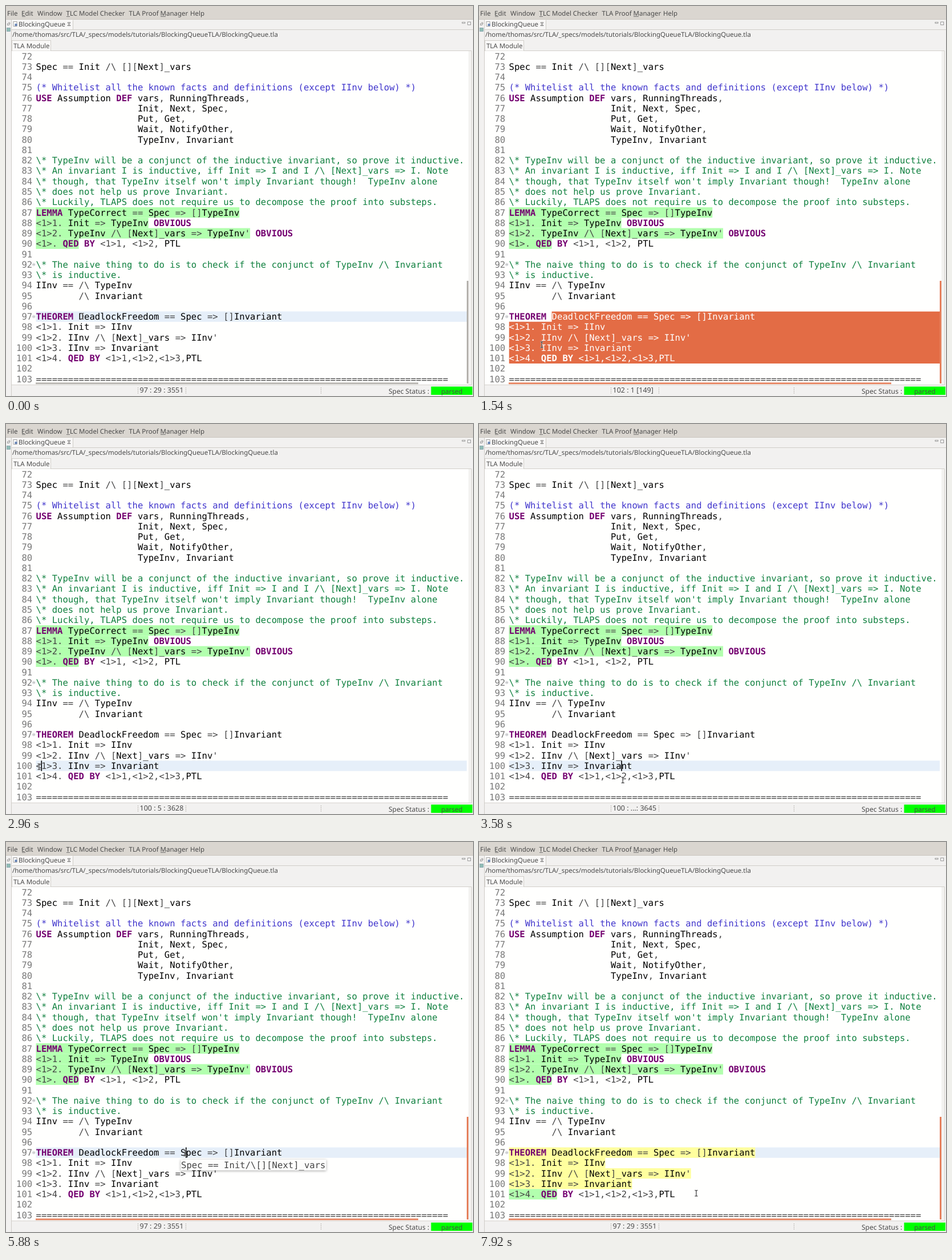
These frames come from a looping animation (819x684 px, 8 s). An HTML page:

```html
<!DOCTYPE html>
<html lang="en">
<head>
<meta charset="utf-8">
<title>Proof editor</title>
<style>
html, body { margin: 0; width: 100%; height: 100%; overflow: hidden; background: #f2f1f0; }
svg { display: block; width: 819px; height: 684px; }
text { text-rendering: geometricPrecision; }
.ui { font: 11.5px "Noto Sans", "Open Sans", sans-serif; fill: #4a4a4a; }
.code { font: 15.6px "DejaVu Sans Mono", monospace; fill: #444; }
.id { fill: #000; }
.kw { fill: #740070; font-weight: bold; }
.line { fill: #10803f; }
.block { fill: #4035cc; }
.num { fill: #787878; text-anchor: end; }
.picked text { fill: #fff; }
</style>
</head>
<body>
<svg id="stage" viewBox="0 0 819 684" xmlns="http://www.w3.org/2000/svg"></svg>
<script>
const LOOP = 8000, FIRST = 72, X0 = 52.5, CW = 9.39, RH = 18.26, EDGE = 808;
const lines = String.raw`
Spec == Init /\ [][Next]_vars

(* Whitelist all the known facts and definitions (except IInv below) *)
USE Assumption DEF vars, RunningThreads,
                   Init, Next, Spec,
                   Put, Get,
                   Wait, NotifyOther,
                   TypeInv, Invariant

\* TypeInv will be a conjunct of the inductive invariant, so prove it inductive.
\* An invariant I is inductive, iff Init => I and I /\ [Next]_vars => I. Note
\* though, that TypeInv itself won't imply Invariant though!  TypeInv alone
\* does not help us prove Invariant.
\* Luckily, TLAPS does not require us to decompose the proof into substeps.
LEMMA TypeCorrect == Spec => []TypeInv
<1>1. Init => TypeInv OBVIOUS
<1>2. TypeInv /\ [Next]_vars => TypeInv' OBVIOUS
<1>. QED BY <1>1, <1>2, PTL

\* The naive thing to do is to check if the conjunct of TypeInv /\ Invariant
\* is inductive.
IInv == /\ TypeInv
        /\ Invariant

THEOREM DeadlockFreedom == Spec => []Invariant
<1>1. Init => IInv
<1>2. IInv /\ [Next]_vars => IInv'
<1>3. IInv => Invariant
<1>4. QED BY <1>1,<1>2,<1>3,PTL
`.split("\n");
lines.push("=".repeat(77));

const rowY = n => 535.6 + (n - 97) * RH;
const colX = c => X0 + c * CW;
const stage = document.getElementById("stage");

function add(parent, tag, attrs = {}, content) {
  const node = document.createElementNS("http://www.w3.org/2000/svg", tag);
  for (const key in attrs) node.setAttribute(key, attrs[key]);
  if (content !== undefined) node.textContent = content;
  parent.appendChild(node);
  return node;
}
const box = (parent, x, y, width, height, fill, more) =>
  add(parent, "rect", { x, y, width, height, fill, ...more });
const stroke = (parent, d, color, width = 1) =>
  add(parent, "path", { d, fill: "none", stroke: color, "stroke-width": width });
const label = (x, y, str, size = 11.5) =>
  add(stage, "text", { x, y, class: "ui", style: `font-size:${size}px` }, str);
const show = (node, on) => node.setAttribute("visibility", on ? "visible" : "hidden");

function drawCode(parent, str, y) {
  const kind = str.startsWith("(*") ? "block" : str.startsWith("\\*") ? "line" : "";
  const rule = kind ? /\S+/g : /[A-Za-z_]\w*|[^\sA-Za-z_]+/g;
  for (const m of str.matchAll(rule)) {
    const type = kind || (/^(USE|DEF|LEMMA|OBVIOUS|QED|BY|THEOREM)$/.test(m[0]) ? "kw"
      : /^[A-Za-z_]/.test(m[0]) ? "id" : "");
    add(parent, "text", { x: colX(m.index), y, class: "code " + type }, m[0]);
  }
}
function drawRows(parent, from) {
  lines.forEach((str, i) => {
    if (i + FIRST >= from) drawCode(parent, str, rowY(i + FIRST) + 14.5);
  });
}
function mark(parent, row, cols, color) {
  return box(parent, X0, rowY(row), cols * CW, RH, color);
}

// Window frame
box(stage, 0, 0, 819, 684, "#f2f1f0");
box(stage, 0, 0, 819, 23.5, "#dad6d0");
stroke(stage, "M0 23.5H819", "#cbc7c0");
[[2, "File"], [27, "Edit"], [55, "Window"], [105.5, "TLC Model Checker"],
 [215.5, "TLA Proof Manager"], [323, "Help"]].forEach(([x, str]) => label(x, 16.6, str));
stroke(stage, "M28 18.5H34M106 18.5H112M271 18.5H280", "#5a5a5a", 0.8);

stroke(stage, "M9.5 684V24M9.5 41.5H819M117.5 41V26Q117.5 23.5 115 23.5", "#cfccc7");
box(stage, 10, 24, 107, 17, "#f8f7f6");
label(22, 35.8, "BlockingQueue", 11.44);
box(stage, 13, 27.5, 6, 8, "#fff", { stroke: "#8a8a8a", "stroke-width": 0.8 });
box(stage, 15.5, 31, 4, 4, "#6a87b8");
stroke(stage, "M108 29L113 34.5M113 29L108 34.5M108 29H113M108 34.5H113", "#666", 0.9);
box(stage, 800, 28.5, 5, 1.8, "#fff", { stroke: "#777", "stroke-width": 0.7 });
box(stage, 809.8, 28, 5, 5, "#fff", { stroke: "#777", "stroke-width": 0.8 });
box(stage, 2.5, 31, 3, 2.6, "#fff", { stroke: "#777", "stroke-width": 0.7 });
stroke(stage, "M4 29.2H6.8V32", "#777", 0.7);
box(stage, 1.5, 38.5, 6, 6, "#8fbcb4", { stroke: "#6f8f9f", "stroke-width": 0.6 });
label(11, 54, "/home/thomas/src/TLA/_specs/models/tutorials/BlockingQueueTLA/BlockingQueue.tla", 11.48);
stroke(stage, "M10 78.5H816.5", "#d2cfca");
box(stage, 10.5, 60.5, 68, 18.5, "#faf9f8", { stroke: "#c9c6c1", "stroke-width": 0.8 });
label(13, 73.7, "TLA Module", 11.44);
box(stage, 10, 79, 801, 585, "#fffffe");
box(stage, 811, 79, 5.5, 585, "#f3f2f0");
stroke(stage, "M10 664.5H817M816.5 79V664", "#d6d3ce");

// Status bar
stroke(stage, "M231.5 669V681M315.5 669V681M552.5 669V681", "#aaa6a0");
[231.5, 315.5, 552.5].forEach(x => stroke(stage, `M${x} 670.5V681`, "#f2f1f0", 1.2)
  .setAttribute("stroke-dasharray", "1.5 1.5"));
const status = label(234.5, 678, "", 12.5);
label(671, 679.6, "Spec Status :", 12);
box(stage, 745.5, 667.5, 72.5, 14.5, "#00ff00");
label(763.3, 680, "parsed", 11.5).setAttribute("fill", "#222");

// Text area
const rowTint = box(stage, X0, 0, EDGE - X0, RH, "#e6eff9");
[[87, 38], [88, 21], [89, 40], [90, 8]].forEach(([r, c]) => mark(stage, r, c, "#b2ffae"));
const proof = add(stage, "g");
[[97, 46], [98, 18], [99, 34], [100, 23]].forEach(([r, c]) => mark(proof, r, c, "#ffff9e"));
const proved = mark(stage, 101, 9, "#b2ffae");
lines.forEach((_, i) =>
  add(stage, "text", { x: 46.2, y: rowY(FIRST + i) + 14.5, class: "code num" }, FIRST + i));
[92, 97].forEach(r => {
  const y = rowY(r) + 9.2;
  add(stage, "circle", { cx: 48.7, cy: y, r: 2.1, fill: "#fff", stroke: "#a9adb5", "stroke-width": 0.7 });
  stroke(stage, `M47.5 ${y}H49.9`, "#777", 0.8);
});
drawRows(stage, FIRST);

// Selected text: an inverted copy, clipped to the selection
const clip = add(add(add(stage, "defs"), "clipPath", { id: "pick" }), "path");
const picked = add(stage, "g", { class: "picked", "clip-path": "url(#pick)" });
box(picked, X0, rowY(97), EDGE - X0, 6 * RH, "#e36c45");
drawRows(picked, 97);

const bars = add(stage, "g");
box(bars, 808, 482, 3, 180, "inherit").removeAttribute("fill");
box(bars, 52, 660.4, 671, 2.8, "inherit").removeAttribute("fill");
const caret = box(stage, 0, 0, 1.6, RH, "#000");

const tip = add(stage, "g", { style: "filter:drop-shadow(0 1px 2px rgba(0,0,0,.35))" });
box(tip, 306.5, 557, 255, 18.8, "#fdfdfc");
add(tip, "text", { x: 307, y: 571.6, class: "code" }, "Spec == Init/\\[][Next]_vars");

const mouse = add(stage, "g");
const beam = "M-2.6 -5H-.8L0 -4.4L.8 -5H2.6M0 -4.4V4.4M-2.6 5H-.8L0 4.4L.8 5H2.6";
stroke(mouse, beam, "rgba(255,255,255,.75)", 2.4);
stroke(mouse, beam, "#222", 1.1);

// Timeline
const GREY = "#b5b2ad", ORANGE = "#e5805c";
const steps = [
  [0, { tint: 97, pos: [97, 28], stat: [97, 28], caret: false, sel: false, bar: GREY, tip: false, proof: false, done: false }],
  [630, { pos: [97, 8], stat: 0, caret: true, bar: ORANGE }],
  [670, { pos: [97, 11], sel: true }],
  [710, { pos: [97, 14] }],
  [750, { pos: [98, 15] }],
  [790, { pos: [99, 19] }],
  [870, { pos: [100, 23] }],
  [920, { pos: [101, 30] }],
  [1000, { pos: [102, 0] }],
  [1540, { caret: false }],
  [1830, { pos: [100, 1], sel: false, tint: 100, caret: true }],
  [2380, { caret: false }],
  [2580, { caret: true }],
  [2880, { bar: "" }],
  [3590, { bar: ORANGE }],
  [3630, { pos: [100, 23] }],
  [3830, { caret: false }],
  [4250, { caret: true }],
  [4670, { caret: false }],
  [5040, { bar: "" }],
  [5380, { bar: ORANGE }],
  [5500, { tint: 97, pos: [97, 28], stat: [100, 23], caret: true }],
  [5710, { stat: 0 }],
  [5880, { tip: true }],
  [6330, { tip: false }],
  [6500, { caret: false }],
  [6880, { proof: true, caret: true }],
  [6920, { done: true }],
  [7380, { bar: "", caret: false }],
  [7580, { caret: true }],
  [7750, { bar: ORANGE, caret: false }]
];
const path = [
  [0, 134, 544], [80, 134, 544], [420, 131, 542], [630, 131, 542], [790, 188.5, 567],
  [1040, 383, 643], [1535, 383, 643], [1540, 110, 594], [1625, 110, 594], [1630, 58, 601],
  [3250, 58, 601], [3630, 281, 628], [4000, 281, 628], [4080, 281, 622], [4250, 281, 622],
  [4670, 286.5, 591], [5040, 286.5, 591], [5500, 314, 545.5], [6000, 314, 545.5],
  [6130, 351, 547.5], [7710, 351, 547.5], [7920, 381, 616], [8000, 381, 616]
];

const starts = { 97: 3523 };
for (let r = 98; r <= 103; r++) starts[r] = starts[r - 1] + lines[r - 1 - FIRST].length + 1;
const offset = ([r, c]) => starts[r] + c;
const walk = (t, from, to) =>
  Math.floor(1 + 22 * Math.min(1, Math.max(0, (t - from) / (to - from))));

function mouseAt(t) {
  const i = Math.max(1, path.findIndex(p => p[0] > t));
  const [t0, x0, y0] = path[i - 1], [t1, x1, y1] = path[i];
  const k = (t - t0) / (t1 - t0);
  return [x0 + (x1 - x0) * k, y0 + (y1 - y0) * k];
}

function statusText(pos, selected) {
  const [r, c] = pos;
  if (selected) return `${r} : ${c + 1} [${offset(pos) - offset([97, 8])}]`;
  const col = r > 99 && c > 8 ? "..." : c + 1 + " ";
  return `${r} : ${col}: ${offset(pos)}`;
}

function pickPath([row, col]) {
  let d = "";
  for (let r = 97; r <= row; r++) {
    const from = colX(r === 97 ? 8 : 0), to = r === row ? colX(col) : EDGE;
    d += `M${from} ${rowY(r)}H${to}V${rowY(r + 1)}H${from}Z`;
  }
  return d;
}

function render(t) {
  const s = {};
  for (const [at, change] of steps) if (at <= t) Object.assign(s, change);
  let pos = s.pos, stat = s.stat || pos;
  if (t >= 2850 && t < 3630) {
    pos = [100, walk(t, 2965, 3630)];
    stat = [100, walk(t, 2850, 3625)];
  }
  show(rowTint, !s.sel);
  rowTint.setAttribute("y", rowY(s.tint));
  show(picked, s.sel);
  if (s.sel) clip.setAttribute("d", pickPath(pos));
  show(caret, s.caret);
  caret.setAttribute("x", colX(pos[1]) - 0.4);
  caret.setAttribute("y", rowY(pos[0]));
  show(bars, s.bar);
  bars.setAttribute("fill", s.bar || GREY);
  show(tip, s.tip);
  show(proof, s.proof);
  show(proved, s.done);
  status.textContent = statusText(stat, s.sel);
  mouse.setAttribute("transform", `translate(${mouseAt(t)})`);
}

const begin = performance.now();
function frame() {
  render((performance.now() - begin) % LOOP);
  requestAnimationFrame(frame);
}
render(0);
requestAnimationFrame(frame);
</script>
</body>
</html>
```
